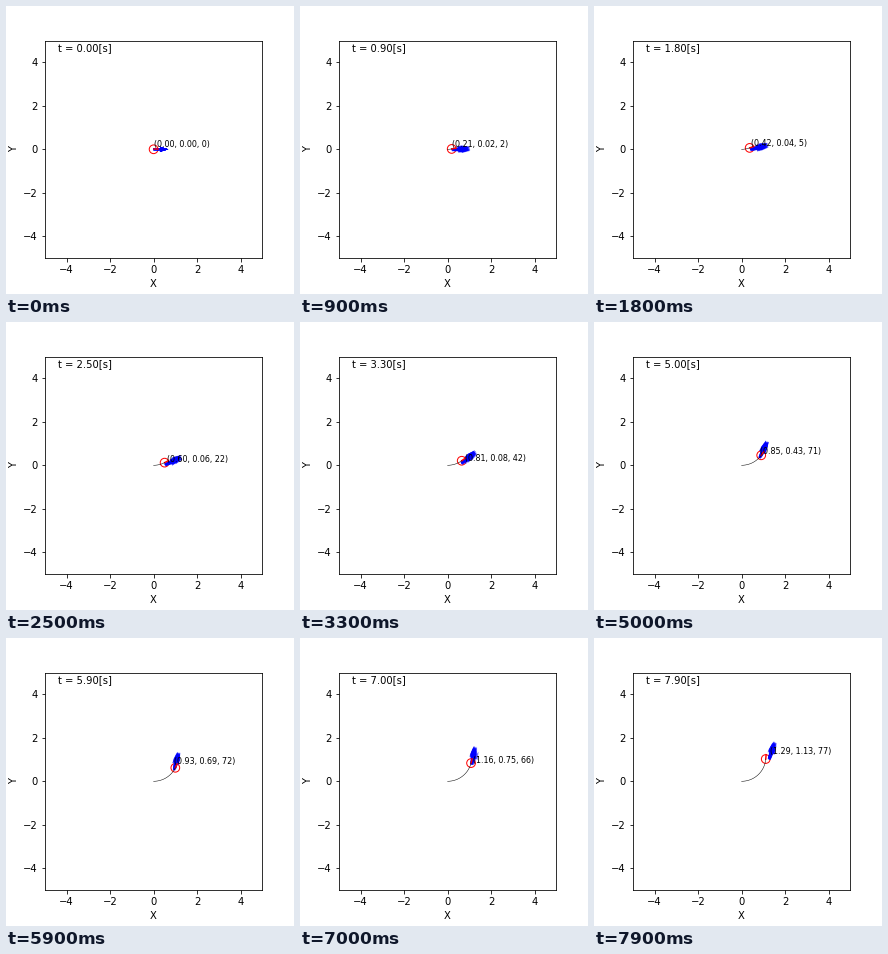
Animation, 288 px wide and 288 px high, one loop 8000 ms. Source, as a matplotlib script:

```python
import numpy as np
import matplotlib.pyplot as plt
from matplotlib.animation import FuncAnimation

STEPS, DT = 80, 0.1
COUNT = 40
RADIUS = 0.2
NU, OMEGA = 0.21, np.radians(10.8)

plt.rcParams["font.family"] = "DejaVu Sans"

times = np.arange(STEPS) * DT
rng = np.random.default_rng(7)

# Robot on a circular arc
heading = OMEGA * times
robot_x = NU / OMEGA * np.sin(heading)
robot_y = NU / OMEGA * (1 - np.cos(heading))

# Best particle: key poses (t, x, y, heading in degrees)
keys = np.array([
    (0, 0, 0, 0), (1.8, 0.42, 0.04, 5.5), (3.3, 0.81, 0.08, 42.5),
    (5.0, 0.85, 0.43, 71.5), (5.9, 0.93, 0.69, 72.5),
    (7.0, 1.16, 0.75, 66.5), (7.9, 1.29, 1.133, 77.5),
])
key_t, poses = keys[:, 0], keys[:, 1:]
best = np.stack([np.interp(times, key_t, c) for c in poses.T], axis=1)


def cubic(t):
    return t[:, None] ** np.arange(1, 4)


# Cloud centre: smooth cubic through the origin fitted to the key poses
fit = np.linalg.lstsq(cubic(key_t), poses, rcond=None)[0]
cx, cy, cdeg = (cubic(times) @ fit).T[:, :, None]
ca = np.radians(cdeg)


def wobble(size):
    """Bounded drift per particle that grows during the first second."""
    phase = rng.uniform(0, 2 * np.pi, COUNT)
    rate = rng.uniform(-0.8, 0.8, COUNT)
    grow = np.minimum(np.sqrt(times), 1)[:, None]
    return size * grow * np.sin(phase + rate * times[:, None])


along, side = wobble(0.1), wobble(0.035)
px = cx + along * np.cos(ca) - side * np.sin(ca)
py = cy + along * np.sin(ca) + side * np.cos(ca)
pt = ca + wobble(np.radians(7))
px[:, 0], py[:, 0], pt[:, 0] = best[:, 0], best[:, 1], np.radians(best[:, 2])

fig = plt.figure(figsize=(4, 4), dpi=72, facecolor="white")
fig.subplots_adjust(left=0.125, right=0.9, bottom=0.125, top=0.88)
ax = fig.add_subplot(111)
ax.set_aspect("equal")
ax.set_xlim(-5, 5)
ax.set_ylim(-5, 5)
ax.set_xlabel("X", fontsize=10)
ax.set_ylabel("Y", fontsize=10)

elems = []


def draw(i):
    while elems:
        elems.pop().remove()
    x, y, a = robot_x[i], robot_y[i], heading[i]
    elems.append(ax.text(-4.4, 4.5, f"t = {times[i]:.2f}[s]", fontsize=10))
    elems.extend(ax.plot([x, x + RADIUS * np.cos(a)],
                         [y, y + RADIUS * np.sin(a)], color="red"))
    elems.append(ax.add_patch(
        plt.Circle((x, y), RADIUS, fill=False, color="red")))
    elems.extend(ax.plot(robot_x[:i + 1], robot_y[:i + 1],
                         lw=0.5, color="black"))
    elems.append(ax.quiver(px[i], py[i], np.cos(pt[i]), np.sin(pt[i]),
                           angles="xy", scale_units="xy", scale=1.5,
                           color="blue", alpha=0.5))
    bx, by, deg = best[i]
    elems.append(ax.text(bx, by + 0.1, f"({bx:.2f}, {by:.2f}, {int(deg)})",
                         fontsize=8))
    return elems


anim = FuncAnimation(fig, draw, frames=STEPS, init_func=lambda: draw(0),
                     interval=100, repeat=True, repeat_delay=0)
plt.show()
```
